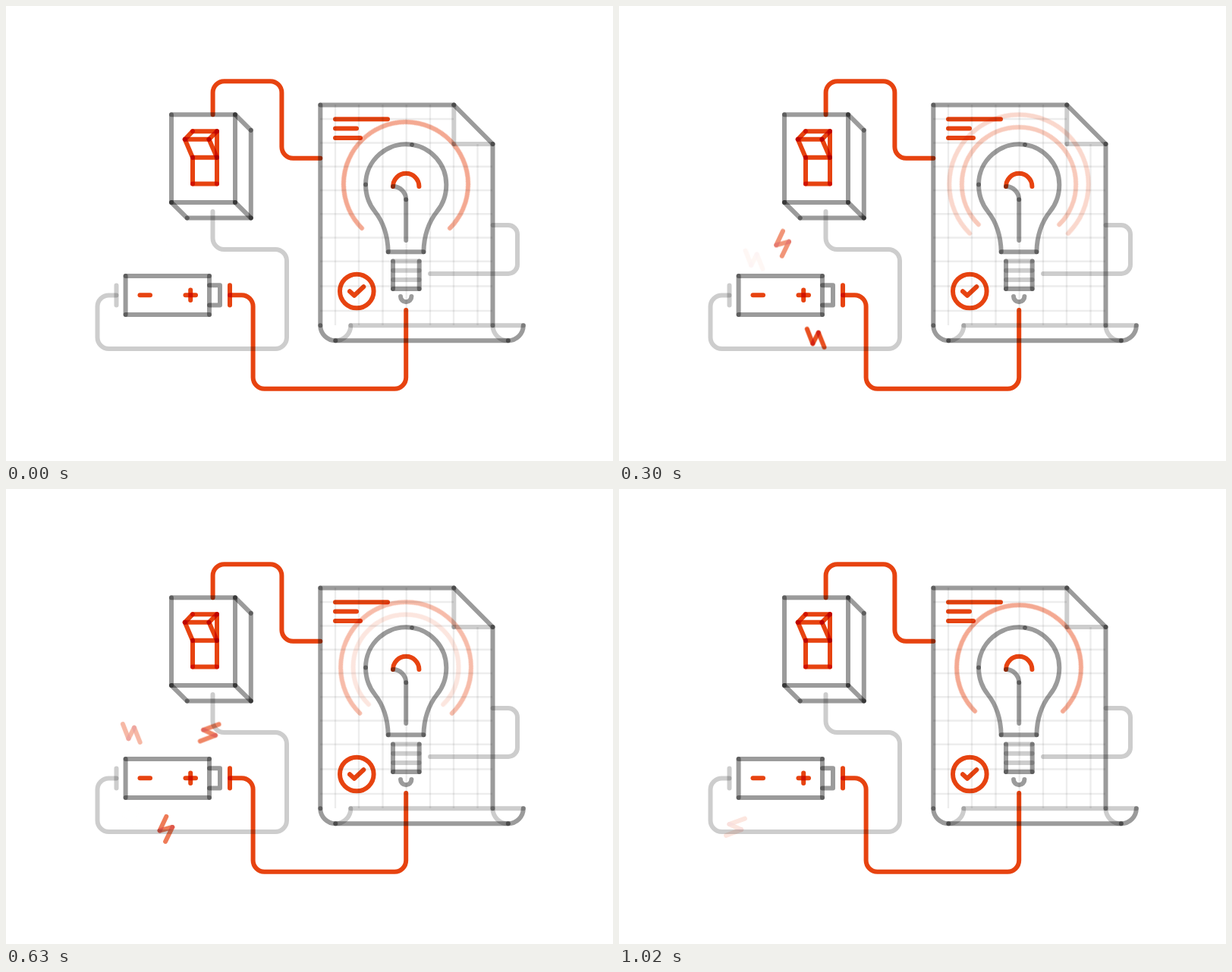
These frames come from a looping animation (800 by 600 pixels, 1.05 s). An HTML page:

```html
<!DOCTYPE html>
<html lang="en">
<head>
<meta charset="utf-8">
<title>Circuit</title>
<style>
html, body { margin: 0; width: 100%; height: 100%; overflow: hidden; background: #fff; }
svg { display: block; width: 800px; height: 600px; background: #fff; }
path, circle, .bolt { mix-blend-mode: multiply; }
path, circle { fill: none; stroke-width: 6; stroke-linecap: round; stroke-linejoin: round; }
.grid path { stroke: #ededed; stroke-width: 2.4; stroke-linecap: butt; }
.pale { stroke: #cdcdcd; }
.gray { stroke: #9b9b9b; }
.hot { stroke: #e74310; }

/* Glow rings: grow steadily, brightest halfway */
.ring { animation: 1050ms linear infinite; }
#ring1 { animation-name: grow1, glow1; }
#ring2 { animation-name: grow2, glow2; }
@keyframes grow1 {
  0% { r: 65.5px; }
  97.143%, 100% { r: 98.5px; }
}
@keyframes glow1 {
  0%, 10.2% { opacity: 0; }
  11.428% { opacity: .14; }
  48.571% { opacity: .46; }
  85.715% { opacity: .14; }
  87.1%, 100% { opacity: 0; }
}
@keyframes grow2 {
  0% { r: 82px; }
  48.571% { r: 98.5px; }
  48.572% { r: 65.5px; }
  97.143%, 100% { r: 82px; }
}
@keyframes glow2 {
  0% { opacity: .46; }
  37.144% { opacity: .14; }
  38.5%, 58.7% { opacity: 0; }
  59.999% { opacity: .14; }
  97.143%, 100% { opacity: .46; }
}

/* Sparks: fly out from (--x, --y) to rest, fading in and out */
.bolt { animation: spark 1050ms linear var(--at) infinite both, fly 1050ms var(--at) infinite both; }
@keyframes spark {
  0%, 40%, 100% { opacity: 0; }
  20% { opacity: 1; }
}
@keyframes fly {
  0% { transform: translate(var(--x), var(--y)); animation-timing-function: cubic-bezier(.3333, 1, .6667, 1); }
  40%, 100% { transform: translate(0, 0); }
}
</style>
</head>
<body>
<svg viewBox="0 0 800 600">
  <defs>
    <g id="tall" class="hot">
      <path d="M0 0L-8.7 18.5"/><path d="M-8.7 18.5L8 14"/><path d="M8 14L-1.2 33"/>
    </g>
    <g id="slant" class="hot">
      <path d="M0 0L7.5 19.3"/><path d="M7.5 19.3L15 4.7"/><path d="M15 4.7L22.7 24"/>
    </g>
    <g id="wide" class="hot">
      <path d="M0 0L-20.5 7.3"/><path d="M-20.5 7.3L-4.7 14.5"/><path d="M-4.7 14.5L-24.8 22.2"/>
    </g>
  </defs>

  <g class="grid">
    <path d="M434 130V421M465 130V421M496.5 130V421M527.7 130V421M559 130V421M590 182V421M621.5 182V421"/>
    <path d="M414 149H590M414 180.5H590M414 211.7H641M414 243H641M414 274.2H641M414 305.5H641M414 336.8H641M414 369.5H641M414 402H641"/>
  </g>

  <!-- Return wires -->
  <g class="pale">
    <path d="M272.5 271V306A15 15 0 0 0 287.5 321H355A15 15 0 0 1 370 336V437A15 15 0 0 1 355 452H135.5A15 15 0 0 1 120.5 437V396.5A15 15 0 0 1 135.5 381.5H145.5"/>
    <path d="M145.5 368.5V394.5"/>
    <path d="M641.5 289H662A12 12 0 0 1 674 301V341A12 12 0 0 1 662 353H559"/>
  </g>

  <!-- Paper -->
  <g class="pale">
    <path d="M590.3 130.5V182"/>
    <path d="M590.3 182H641.5"/>
    <path d="M434.3 441.3A20 20 0 0 0 454.3 421.3"/>
    <path d="M454.3 421.3H682"/>
    <path d="M641.5 421.3A20 20 0 0 0 661.8 441.3"/>
  </g>
  <g class="gray">
    <path d="M414.3 130.5V421.3"/>
    <path d="M414.3 130.5H590.3"/>
    <path d="M590.3 130.5L641.5 182"/>
    <path d="M641.5 182V421.3"/>
    <path d="M414.3 421.3A20 20 0 0 0 434.3 441.3"/>
    <path d="M434.3 441.3H661.8"/>
    <path d="M661.8 441.3A20 20 0 0 0 681.8 421.3"/>
  </g>
  <g class="hot">
    <path d="M434 149.3H503M434 161.6H462M434 174H467"/>
    <circle cx="462.3" cy="376" r="22.3"/>
    <path d="M453 376.3L459 381.8L471.3 370.2"/>
  </g>

  <!-- Bulb -->
  <g class="gray">
    <path d="M474 235.5A53.2 53.2 0 0 1 535 182.9"/>
    <path d="M535 182.9A53.2 53.2 0 0 1 580.3 235.5C580.3 250 575.5 262 568 271C557 285 550.8 304 550.4 324.2"/>
    <path d="M474 235.5C474 250 479 262 486.2 271C497.3 285 503.2 304 503.7 324.2"/>
    <path d="M503.7 324.2H550.4"/>
    <path d="M510 238A17.2 17.2 0 0 1 527.2 255.2"/>
    <path d="M527.2 255.2V309"/>
    <path d="M510 336.6V373"/>
    <path d="M544.7 336.6V373"/>
    <path d="M510 373H544.7"/>
    <path d="M520 383A7.2 7.2 0 0 0 534.4 383"/>
  </g>
  <path class="pale" d="M510 336.6H544.7M510 348.8H544.7M510 361H544.7"/>
  <path class="hot" d="M510 238A17.2 17.2 0 0 1 544.4 238"/>

  <!-- Switch -->
  <g class="gray">
    <path d="M218 143.2H302"/>
    <path d="M302 143.2V259"/>
    <path d="M302 259H218"/>
    <path d="M218 259V143.2"/>
    <path d="M302 143.2L322.8 163.8"/>
    <path d="M322.8 163.8V279.6"/>
    <path d="M322.8 279.6H238.7"/>
    <path d="M238.7 279.6L218 259"/>
    <path d="M302 259L322.8 279.6"/>
  </g>
  <g class="hot">
    <path d="M246 165.2H278"/>
    <path d="M235.8 175.8H267.5"/>
    <path d="M246 165.2L235.8 175.8"/>
    <path d="M278 165.2L267.5 175.8"/>
    <path d="M235.8 175.8L246 199.8"/>
    <path d="M267.5 175.8L278 199.8"/>
    <path d="M278 165.2V199.8"/>
    <path d="M246 199.8H278"/>
    <path d="M246 199.8V234.4"/>
    <path d="M278 199.8V234.4"/>
    <path d="M246 234.4H278"/>
  </g>

  <!-- Battery -->
  <g class="gray">
    <path d="M157.6 356H268"/>
    <path d="M268 356V407"/>
    <path d="M268 407H157.6"/>
    <path d="M157.6 407V356"/>
    <path d="M268 368.3H282V394.5H268"/>
  </g>
  <g class="hot">
    <path d="M176.5 381.3H190"/>
    <path d="M236.5 381.3H250"/>
    <path d="M243.2 374.6V388"/>
  </g>

  <!-- Live wires -->
  <g class="hot">
    <path d="M272.6 143.2V114.3A15 15 0 0 1 287.6 99.3H348.4A15 15 0 0 1 363.4 114.3V185.8A15 15 0 0 0 378.4 200.8H414.3"/>
    <path d="M295 368.3V394.5"/>
    <path d="M295 381.3H310.6A15 15 0 0 1 325.6 396.3V489.7A15 15 0 0 0 340.6 504.7H512.2A15 15 0 0 0 527.2 489.7V401"/>
  </g>

  <g class="hot" transform="rotate(135 527 235)">
    <circle id="ring1" class="ring" cx="527" cy="235" r="65.5" pathLength="360" stroke-dasharray="270 90"/>
    <circle id="ring2" class="ring" cx="527" cy="235" r="82" pathLength="360" stroke-dasharray="270 90"/>
  </g>

  <g class="bolt" style="--at:0ms; --x:0px; --y:18px"><use href="#tall" x="216" y="296.4"/></g>
  <g class="bolt" style="--at:105ms; --x:-12px; --y:-16px"><use href="#slant" x="249.7" y="428.4"/></g>
  <g class="bolt" style="--at:291ms; --x:13.7px; --y:13.7px"><use href="#slant" x="153.9" y="309.9"/></g>
  <g class="bolt" style="--at:360ms; --x:0px; --y:-24px"><use href="#tall" x="211.3" y="433"/></g>
  <g class="bolt" style="--at:495ms; --x:-15px; --y:15px"><use href="#wide" x="285.3" y="305.7"/></g>
  <g class="bolt" style="--at:630ms; --x:12px; --y:-13px"><use href="#wide" x="165.9" y="434.7"/></g>
</svg>
</body>
</html>
```
